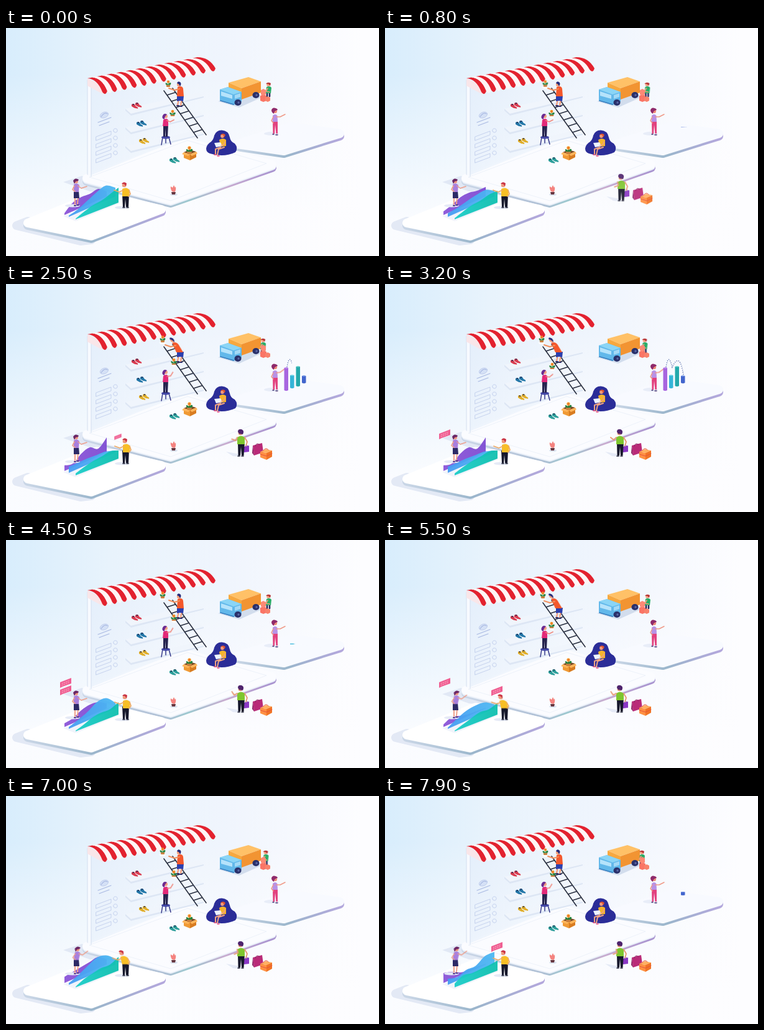
These frames come from a looping animation (600x367 px, 8 s). An HTML page:

```html
<!DOCTYPE html>
<html lang="en">
<head>
<meta charset="utf-8">
<title>Isometric shop</title>
<style>
html, body { margin: 0; width: 100%; height: 100%; overflow: hidden; background: #fff; }
svg { display: block; width: 100vw; height: 100vh; }
.line { fill: none; stroke-linecap: round; stroke-linejoin: round; }
.move { animation: 8s ease-in-out infinite; }
.slab { stroke-width: 14; stroke-linejoin: round; }

/* Ladder climber and woman on the stool */
#lean { animation-name: lean; transform-origin: 280px 112px; }
@keyframes lean {
  0%, 12%, 56%, 60%, 80%, 100% { transform: skewX(0); }
  21.25% { transform: skewX(6deg); }
  32%, 44%, 67%, 71% { transform: skewX(27deg); }
}
#reach { animation-name: reach; }
@keyframes reach {
  0%, 12%, 56%, 60%, 80%, 100% { transform: none; }
  21.25% { transform: translate(-2px, 0); }
  32%, 44%, 67%, 71% { transform: translate(-6px, 1px); }
}
#high { animation-name: high; }
@keyframes high {
  0%, 5% { transform: none; }
  17%, 58% { transform: translate(-9px, -1px); }
  68.75% { transform: translate(-7px, -1px); }
  78%, 91% { transform: translate(-9px, -1px); }
  98.75%, 100% { transform: translate(-3px, 0); }
}
#lift { animation-name: lift; }
@keyframes lift {
  0%, 11%, 43%, 46%, 67%, 74% { transform: none; }
  19%, 33%, 53%, 60%, 83%, 100% { transform: translate(2px, -12px); }
  40% { transform: translate(1px, -5px); }
}
#arms { animation-name: arms; transform-origin: 259px 148px; }
@keyframes arms {
  0%, 11%, 43%, 46%, 67%, 74% { transform: none; }
  19%, 33%, 53%, 60%, 83%, 100% { transform: rotate(-32deg); }
  40% { transform: rotate(-13deg); }
}

/* Loader, presenter and shopper */
#loader { animation-name: loader; }
@keyframes loader {
  0%, 8%, 53%, 72%, 100% { transform: none; }
  19%, 30%, 98.75%, 99.9% { transform: translateX(-9px); }
  40%, 87.5% { transform: translateX(-4.5px); }
}
#point { animation-name: point; transform-origin: 435px 143px; }
@keyframes point {
  0%, 10%, 54%, 100% { transform: none; }
  19%, 45% { transform: rotate(-9deg); }
}
#shopper { animation-name: arrive; }
@keyframes arrive {
  0%, 2% { opacity: 0; transform: translate(26px, 13px); }
  12%, 100% { opacity: 1; transform: none; }
}
#wave { animation-name: wave; transform-origin: 372px 247px; }
@keyframes wave {
  0%, 25%, 80%, 100% { transform: rotate(-58deg); }
  35%, 46% { transform: none; }
  56%, 70% { transform: rotate(18deg); }
}

/* Chart pair */
#girl { animation-name: girl; transform-origin: 113px 264px; }
@keyframes girl {
  0%, 60% { transform: none; }
  67%, 100% { transform: skewX(-8deg); }
}
#girlArm { animation-name: girlArm; transform-origin: 116px 254px; }
@keyframes girlArm {
  0%, 60% { transform: none; }
  67%, 100% { transform: rotate(-22deg); }
}
#guy { animation-name: guy; transform-origin: 192px 272px; }
@keyframes guy {
  0%, 10%, 92%, 100% { transform: none; }
  20%, 58% { transform: translate(1px, 0); }
  67%, 88% { transform: skewX(13deg); }
}

/* Bubbles */
.bubble { transform-box: fill-box; transform-origin: 50% 100%; }
#sayR { animation-name: sayR; }
@keyframes sayR {
  0%, 15%, 33%, 63%, 78%, 93%, 100% { transform: scale(0); }
  18%, 30%, 66%, 75%, 96%, 99.9% { transform: scale(1); }
}
#sayL1 { animation-name: sayL1; }
@keyframes sayL1 {
  0%, 33% { transform: scale(0); }
  36%, 50% { transform: scale(1); }
  53%, 74% { transform: translateY(-12px) scale(1); }
  77%, 100% { transform: translateY(-12px) scale(0); }
}
#sayL2 { animation-name: sayL2; }
@keyframes sayL2 {
  0%, 51%, 64%, 100% { transform: scale(0); }
  54%, 61% { transform: scale(1); }
}

/* Bars rise from the floor and sink back */
.bar { transform-box: fill-box; transform-origin: 50% 100%; animation: grow 8s ease-in-out infinite backwards; }
#bar2 { animation-delay: .12s; }
#bar4 { animation-name: growLast; }
@keyframes grow {
  0%, 12%, 56%, 100% { transform: scaleY(0); }
  19%, 49% { transform: none; }
}
@keyframes growLast {
  0%, 9%, 54%, 96.5%, 100% { transform: scaleY(0); }
  16%, 47% { transform: none; }
  99.9% { transform: scaleY(.6); }
}
#hops { animation-name: hops; }
@keyframes hops {
  0%, 28% { clip-path: inset(0 100% 0 0); opacity: 1; }
  37%, 44% { clip-path: inset(0 0 0 0); opacity: 1; }
  52%, 100% { clip-path: inset(0 0 0 0); opacity: 0; }
}
</style>
</head>
<body>
<svg viewBox="0 0 600 367" preserveAspectRatio="none">
  <defs>
    <linearGradient id="sky">
      <stop offset="0" stop-color="#d8edfc"/><stop offset=".28" stop-color="#e8f3fc"/>
      <stop offset=".6" stop-color="#f0f5fd"/><stop offset=".95" stop-color="#fdfdff"/>
    </linearGradient>
    <linearGradient id="fade" x2="0" y2="1">
      <stop offset=".2" stop-color="#fdfdff" stop-opacity="0"/><stop offset=".85" stop-color="#fdfdff" stop-opacity=".92"/>
    </linearGradient>
    <linearGradient id="edge">
      <stop offset="0" stop-color="#cad6e7"/><stop offset=".42" stop-color="#aebfd4"/>
      <stop offset=".55" stop-color="#9cc8cf"/><stop offset=".75" stop-color="#c9acd0"/>
      <stop offset="1" stop-color="#a994d0"/>
    </linearGradient>
    <linearGradient id="edge2">
      <stop offset="0" stop-color="#c9d6e6"/><stop offset=".5" stop-color="#9bb6cc"/>
      <stop offset="1" stop-color="#b3a8dc"/>
    </linearGradient>
    <linearGradient id="wall" x2="1" y2=".6">
      <stop offset="0" stop-color="#e3eefb"/><stop offset="1" stop-color="#f3f7fd" stop-opacity=".6"/>
    </linearGradient>
    <linearGradient id="violet"><stop offset="0" stop-color="#8b55d8"/><stop offset="1" stop-color="#7e4bd2"/></linearGradient>
    <linearGradient id="azure"><stop offset="0" stop-color="#469bf2"/><stop offset="1" stop-color="#4cb8f2"/></linearGradient>
    <linearGradient id="mint"><stop offset="0" stop-color="#1bcdc8"/><stop offset="1" stop-color="#0fbfae"/></linearGradient>
    <path id="floor" d="M130 242 292 184 428 220 265 277Z"/>
    <path id="floorL" d="M35 314 146 269 250 292 137 335Z"/>
    <path id="floorR" d="M372 187 459 159 537 170 447 198Z"/>
    <g id="plant">
      <path d="M-4 3H4L3 7H-3Z" fill="#c9803f"/>
      <path d="M0 3Q-6 4-5-1Q-2-1 0 3Q1-2 5-1Q6 4 0 3" fill="#27843f"/>
      <path class="line" d="M0 3V-3" stroke="#27843f"/>
      <circle cy="-3" r="2.7" fill="#f59a2c"/><circle cy="-3" r="1" fill="#e2532d"/>
    </g>
    <g id="shoe">
      <path d="M-5-3Q-2-5 0-3Q1 0 4 1Q6 2 5 4Q0 4-5 0Z"/>
      <path class="line" d="M-5 1Q0 4.6 5 4.4" stroke="#f4f6fb" stroke-width="1"/>
      <path d="M-4-3Q-2-4.5-.5-3L-2-1.5Z" fill="#2b3157"/>
    </g>
    <g id="shoes"><use href="#shoe" x="3" y="-1"/><use href="#shoe" x="-3" y="1"/></g>
    <g id="talk">
      <path d="M-9-1 9-8V1L-5 6-9 8Z" fill="#ef5f92"/>
      <path class="line" d="M-6 1 6-3.7M-6 3.8 5-.6" stroke="#ffc0d4" stroke-width=".8" stroke-dasharray="1.6 1.8"/>
    </g>
  </defs>

  <rect width="600" height="367" fill="url(#sky)"/>
  <rect width="600" height="367" fill="url(#fade)"/>

  <!-- Platforms -->
  <g class="slab">
    <path d="M92 248 122 238 190 267 135 263Z" fill="#dbe3f2" opacity=".75"/>
    <path d="M17 318 35 311 137 341 120 343Z" fill="#e3e9f5" stroke="#e3e9f5"/>
    <use href="#floorR" y="4" fill="url(#edge2)" stroke="url(#edge2)"/>
    <use href="#floorR" fill="#f8faff" stroke="#f8faff"/>
    <use href="#floor" y="5" fill="url(#edge)" stroke="url(#edge)"/>
    <use href="#floor" y="2" fill="#eaf0f9" stroke="#eaf0f9"/>
    <use href="#floor" fill="#fbfcff" stroke="#fbfcff"/>
    <path d="M134 240 292 181 419 218 265 278Z" fill="none" stroke="#edf2fa" style="stroke-width:1"/>
    <use href="#floorL" y="4" fill="url(#edge2)" stroke="url(#edge2)"/>
    <use href="#floorL" fill="#fff" stroke="#fff"/>
  </g>

  <!-- Wall and shelves -->
  <path d="M134 94V238L316 165 308 62Z" fill="url(#wall)"/>
  <path d="M131 84V236L137 239V88Z" fill="#f7faff"/>
  <path d="M131 84V236M137 92V239" class="line" stroke="#d0dcee" stroke-width=".9"/>
  <g id="shelves"></g>
  <g class="line" stroke="#bccaea" stroke-width=".8">
    <ellipse cx="158" cy="140" rx="7" ry="4.5" transform="rotate(-22 158 140)" fill="#d5e1f6"/>
    <path d="M153 143Q158 135 163 138M148 152 169 144M150 157 166 151" stroke="#a9b9e2" stroke-width="1.2"/>
    <path id="fields" d=""/>
  </g>
  <use href="#shoes" x="210" y="125" fill="#d93b4f"/>
  <use href="#shoes" x="218" y="154" fill="#2377a8"/>
  <use href="#shoes" x="222" y="182" fill="#e0ad28"/>
  <use href="#shoes" x="271" y="213" fill="#2a9d99"/>

  <!-- Awning -->
  <path d="M131 81V93L157 107 150 90Z" fill="#f9e6e9"/>
  <g id="awning"></g>

  <!-- Ladder -->
  <path id="ladder" class="line" stroke="#2a3040" stroke-width="1.6"/>

  <!-- Climber -->
  <g>
    <path class="line" d="M278 115 276 124M283 115 281 124" stroke="#f0a080" stroke-width="2.4"/>
    <path class="line" d="M275 125H278M280 126H283" stroke="#30316f" stroke-width="2"/>
    <path d="M275 109H286L285 118 280 117 275 118Z" fill="#2b3fae"/>
    <g id="high" class="move">
      <use href="#plant" transform="translate(261 89) scale(.85)"/>
      <path d="M255 95H266L264 98H258Z" fill="#fff" opacity=".95"/>
    </g>
    <g id="lean" class="move">
      <path d="M276 95Q284 92 285 98L286 110H275Z" fill="#f4582c"/>
      <circle cx="278" cy="91" r="3.1" fill="#f2a07c"/>
      <path d="M275 89Q276 85 280 87Q283 89 280 94Q279 90 275 89" fill="#242a79"/>
    </g>
    <path id="reach" class="move line" d="M279 98 271 100 262 97" stroke="#f2905d" stroke-width="2"/>
  </g>

  <!-- Woman on stool -->
  <g>
    <path class="line" d="M252 176 250 188M262 176 265 187M257 177V185" stroke="#353889" stroke-width="1.5"/>
    <ellipse cx="257" cy="176" rx="7" ry="2.4" fill="#4347a5"/>
    <path d="M253 155H261L260 175H257V162L256 175H253Z" fill="#25234e"/>
    <path d="M253 148Q258 144 261 148L261 158H252Z" fill="#e32a78"/>
    <circle cx="257" cy="142" r="3" fill="#f2a183"/>
    <path d="M259 139Q254 136 252 141Q250 146 255 147Q255 142 259 139" fill="#6b2b91"/>
    <g id="lift" class="move"><use href="#plant" transform="translate(268 137) scale(.9)"/><path d="M264 142H272L271 145H266Z" fill="#fff"/></g>
    <g id="arms" class="move"><path class="line" d="M259 149 264 151 270 148" stroke="#ef8b80" stroke-width="1.8"/></g>
  </g>

  <!-- Floor items -->
  <path d="M286 200 296 203V213L286 209Z" fill="#f09a35"/><path d="M296 203 306 199V208L296 213Z" fill="#d87c21"/>
  <path d="M286 200 295 196 306 199 296 203Z" fill="#7a4a24"/><path d="M286 200 283 203 293 206 296 203M306 199 308 202 299 206 296 203" fill="#ffb55a"/>
  <use href="#plant" x="295" y="196"/>
  <ellipse cx="270" cy="268" rx="6" ry="2" fill="#dce5f2"/>
  <path d="M266 264H273L272 268H267Z" fill="#663740"/>
  <path d="M267 263Q264 258 265 255L268 257 270 253 272 257 273 255Q274 262 271 264Z" fill="#f4837f"/>

  <!-- Beanbag -->
  <path d="M322 194Q323 187 330 183Q334 179 335 173Q338 164.500 347 164.500Q358 165 360 176Q361 183 368 186Q374 193 369 200Q350 209 328 202Q322 200 322 194Z" fill="#2b2d98"/>
  <path d="M343 180Q349 176 354 180L354 190 345 191Z" fill="#f5b52d"/>
  <circle cx="348" cy="174" r="2.9" fill="#ef9b7d"/><path d="M345 172Q349 168 353 172L351 176 349 172Z" fill="#e0552f"/>
  <path class="line" d="M351 192 342 195 340 204M345 192 337 195 337 203" stroke="#f0a583" stroke-width="2"/>
  <path d="M335 185 345 184 348 190 338 192Z" fill="#eef3ff"/><path class="line" d="M352 183 351 187 346 189" stroke="#f1a084" stroke-width="1.5"/>
  <path class="line" d="M335 204H338M340 206H343" stroke="#e6407a" stroke-width="1.5"/>

  <!-- Truck -->
  <path d="M341 118 375 128 413 111 400 104Z" fill="#d2dded"/>
  <path d="M358 88 390 79 410 86 379 97Z" fill="#ffc167"/>
  <path d="M358 88 379 97V116L358 108Z" fill="#f7a83f"/>
  <path d="M379 97 410 86V104L379 115Z" fill="#f29432"/>
  <path d="M344 99 357 95 379 103V119L366 124 344 117Z" fill="#62b8ea"/>
  <path d="M344 99 357 95 379 103 366 107Z" fill="#8bd5f6"/>
  <path d="M346 102 364 108V114L346 109Z" fill="#b5e3fb"/><path d="M368 108 377 105V111L368 114Z" fill="#a3d9f6"/>
  <path class="line" d="M345 117 366 123" stroke="#397fc0" stroke-width="1.6"/>
  <g fill="#29306a"><ellipse cx="373" cy="120" rx="5.500" ry="5"/><ellipse cx="402" cy="108" rx="5.500" ry="5"/></g>
  <g fill="#5a66a5"><circle cx="374" cy="120" r="1.7"/><circle cx="403" cy="108" r="1.7"/></g>

  <!-- Loader -->
  <g id="loader" class="move">
    <path class="line" d="M420 104V110M424 104V110" stroke="#27275c" stroke-width="2.6"/>
    <path d="M419 95Q424 92 427 96L426 105H418Z" fill="#27ad68"/>
    <circle cx="422" cy="91" r="2.8" fill="#ef9d7b"/><path d="M418 90Q421 86 426 89L425 93 422 90Z" fill="#b73435"/>
    <path class="line" d="M421 97 418 102 424 103" stroke="#ef9d7b" stroke-width="1.7"/>
  </g>
  <path d="M409 109 414 107 419 109V117L414 119 409 117Z" fill="#fa7566"/><path d="M410 100 414 98 418 100V107L414 109 410 107Z" fill="#fc8975"/>
  <path d="M417 112 421 110 425 112V117L421 119 417 117Z" fill="#f8826c"/>

  <!-- Presenter -->
  <ellipse cx="427" cy="170" rx="12" ry="3" fill="#e8edf8"/>
  <path d="M429 150H437L437 170H434.500L433 156 432 170H429.500Z" fill="#e2417e"/>
  <path class="line" d="M429 171H431M434 172H437" stroke="#40276a" stroke-width="1.4"/>
  <path d="M429 141Q433 137 436.500 141L437 151H428.500Z" fill="#b892e5"/>
  <circle cx="433" cy="134" r="3.1" fill="#ef8c78"/><path d="M436 130Q429 126 427 132Q427 136 431 138Q431 133 437 132Z" fill="#8f2a6b"/>
  <path class="line" d="M430 143 427 149 430 153" stroke="#ef9a88" stroke-width="1.5"/>
  <path id="point" class="move line" d="M435 143 441 143 449 139" stroke="#ef9a88" stroke-width="1.6"/>
  <g id="bars"></g>
  <path id="hops" class="move" d="M452 134Q456 109 462 134Q474 108 480 146" fill="none" stroke="#5267a8" stroke-width="1.3" stroke-dasharray="1.3 2"/>

  <!-- Chart -->
  <path d="M92 303 112 311 183 282 165 275Z" fill="#f1f4fb"/>
  <g id="waves"></g>

  <!-- Chart pair -->
  <ellipse cx="107" cy="286" rx="12" ry="2.5" fill="#e5eaf6"/>
  <path class="line" d="M111 272V284M116 272 115 283" stroke="#eea08b" stroke-width="2"/>
  <path class="line" d="M110 286H112M114 285H117" stroke="#4a318c" stroke-width="1.8"/>
  <path d="M109 262H117L118 274H109Z" fill="#2d2a66"/>
  <g id="girl" class="move">
    <path d="M109 252Q114 248 118 253L117 264H109Z" fill="#a97fdd"/>
    <circle cx="113" cy="247" r="3" fill="#ef947f"/><path d="M108 246Q111 240 117 244L116 246 112 247 110 251Z" fill="#6a2765"/>
    <path class="line" d="M110 254 107 260 111 263" stroke="#eca08d" stroke-width="1.7"/>
    <path id="girlArm" class="move line" d="M116 254 121 258 130 255" stroke="#eca08d" stroke-width="1.6"/>
  </g>
  <ellipse cx="187" cy="289" rx="12" ry="2.4" fill="#e5eaf6"/>
  <path d="M187 268H198L197 288H193L192 275 191 288H188Z" fill="#15172a"/>
  <path class="line" d="M188 289H191M194 289H197" stroke="#15172a" stroke-width="1.6"/>
  <g id="guy" class="move">
    <path d="M187 259Q194 255 199 261L198 271H187Z" fill="#f8bf26"/>
    <circle cx="190" cy="253" r="3.3" fill="#ed997c"/><path d="M186 251Q189 246 194 250L193 255 190 251Z" fill="#c93243"/>
    <path class="line" d="M189 261 182 264 174 261M198 261 200 267 197 271" stroke="#eeaa65" stroke-width="1.8"/>
  </g>
  <g transform="translate(180 243)"><use id="sayR" class="move bubble" href="#talk"/></g>
  <g transform="translate(96 242)"><use id="sayL1" class="move bubble" href="#talk"/><use id="sayL2" class="move bubble" href="#talk"/></g>

  <!-- Shopper -->
  <g id="shopper" class="move">
    <path d="M354 270 376 274 378 278 365 277Z" fill="#e5eaf6"/>
    <path d="M383 262 391 260V270L383 271Z" fill="#8a38c4"/>
    <path class="line" d="M385 262Q386 257 389 261" stroke="#6a2da0"/>
    <path d="M373 255H384L382.500 276H379L378 262 377 276H373.500Z" fill="#17182c"/>
    <path class="line" d="M373 277H376M379 277H382" stroke="#17182c" stroke-width="1.5"/>
    <path d="M372 247Q378 242 384 247L384 258H372Z" fill="#7fc62f"/>
    <circle cx="377" cy="240" r="3.3" fill="#e49678"/><path d="M373 238Q373 233 379 234Q384 236 381 242L375 241Z" fill="#4f246d"/>
    <path class="line" d="M384 247 388 254 386 260" stroke="#e89c79" stroke-width="2"/>
    <path id="wave" class="move line" d="M372 247 368 251 363 247" stroke="#e89c79" stroke-width="2"/>
    <path d="M397 260 412 256 414 271 399 276Z" fill="#b92b78"/><path d="M397 260 399 276 396 272Z" fill="#8e1e63"/>
    <path class="line" d="M401 261Q403 254 408 259" stroke="#882363"/>
    <path d="M409 270 418 266 428 268 419 272Z" fill="#ffb060"/><path d="M409 270 419 272V283L409 279Z" fill="#ff9143"/><path d="M419 272 428 268V278L419 283Z" fill="#f17426"/>
    <path class="line" d="M409 274 419 277 428 273M414 268Q418 262 422 267" stroke="#e5533c"/>
  </g>
</svg>

<script>
const SVG = "http://www.w3.org/2000/svg";
const LOOP = 8000;
const $ = id => document.getElementById(id);

function add(parent, d, fill, attrs = {}) {
  const path = document.createElementNS(SVG, "path");
  for (const [k, v] of Object.entries({ d, fill, ...attrs })) path.setAttribute(k, v);
  return $(parent).appendChild(path);
}

// Awning stripes run over a curved roof and end in a scallop.
const STRIPES = 23;
const ridge = t => [131 + 177 * t, 81 - 34 * t];
const hem = t => [155 + 182 * t, 103 - 38 * t];
const bend = t => [147 + 180 * t, 82 - 35 * t];
for (let i = 0; i < STRIPES; i++) {
  const a = i / STRIPES, b = (i + 1) / STRIPES;
  const [x, y] = hem((a + b) / 2);
  add("awning", `M${ridge(a)}Q${bend(a)} ${hem(a)}Q${x + 1},${y + 8} ${hem(b)}Q${bend(b)} ${ridge(b)}Z`,
    i % 2 ? "#fff5f5" : "#e3222f");
}

for (let i = 0; i < 3; i++) {
  const y = 130 + i * 30;
  add("shelves", `M192 ${y}L310 ${y - 26} 318 ${y - 20} 201 ${y + 8}Z`, "#f0f5fc");
  add("shelves", `M192 ${y}L201 ${y + 8} 318 ${y - 20}V${y - 18}L201 ${y + 11} 192 ${y + 3}Z`, "#dde6f4");
}

let fields = "";
for (let i = 0; i < 4; i++) {
  const y = 175 + i * 12;
  fields += `M145 ${y}L169 ${y - 9}V${y - 3}L145 ${y + 6}ZM173 ${y - 9}a3 3 0 1 0 6-2a3 3 0 1 0-6 2`;
}
$("fields").setAttribute("d", fields);

let ladder = "M254 101 308 177M268 97 322 172";
for (let i = 0; i < 7; i++) {
  const x = 259 + i * 7.1, y = 108 + i * 10;
  ladder += `M${x} ${y}l14-4.5`;
}
$("ladder").setAttribute("d", ladder);

// Bars: left, top, bottom, face, cap
[[447.5, 135, 171, "#a765df", "#c490ee"], [457, 147, 167, "#35b5d8", "#79d9e9"],
 [466.5, 133, 164, "#23a9ab", "#65d0c8"], [476, 148, 159, "#4265cd", "#7798e7"]
].forEach(([x, y, end, face, cap], i) => {
  const g = $("bars").appendChild(document.createElementNS(SVG, "g"));
  g.id = "bar" + (i + 1);
  g.setAttribute("class", "bar");
  add(g.id, `M${x} ${y}V${end}q3.3 2 6.5 0V${y}Z`, face);
  add(g.id, `M${x} ${y}q3.2-2 6.5 0q-3.2 2-6.5 0`, cap);
});

// Each wave stands on a slanted base line; its heights change between key poses.
const times = [0, 1700, 3200, 4500, 5500, 7000, 7900, 8000];
const waves = [
  { from: [94, 301], to: [162, 271], fill: "violet", poses: [
    [3, 14, 17, 16, 18, 8], [9, 6, 16, 20, 12, 24], [6, 8, 15, 18, 16, 8],
    [4, 10, 6, 3, 2, 1], [10, 12, 14, 16, 18, 8], [16, 12, 5, 3, 2, 1]] },
  { from: [101, 304], to: [176, 271], fill: "azure", poses: [
    [2, 6, 13, 20, 24, 14], [10, 10, 10, 9, 8, 3], [3, 8, 14, 23, 23, 9],
    [2, 10, 16, 18, 16, 6], [3, 9, 17, 24, 21, 9], [10, 6, 11, 11, 20, 20]] },
  { from: [112, 308], to: [181, 281], fill: "mint", poses: [
    [1, 7, 12, 14, 19, 24], [3, 8, 12, 14, 17, 13], [1, 6, 12, 14, 14, 20],
    [1, 6, 11, 15, 14, 19], [1, 8, 12, 15, 15, 22], [6, 14, 12, 13, 14, 16]] }
];
const order = [0, 1, 1, 2, 3, 4, 5, 5];
for (const w of waves) w.path = add("waves", "", `url(#${w.fill})`, { opacity: .95 });

function curve(points) {
  const at = i => points[Math.max(0, Math.min(points.length - 1, i))];
  let d = `L${points[0]}`;
  for (let i = 0; i < points.length - 1; i++) {
    const [a, b, c, e] = [at(i - 1), at(i), at(i + 1), at(i + 2)];
    const p = b.map((v, k) => v + (c[k] - a[k]) / 6);
    const q = c.map((v, k) => v - (e[k] - b[k]) / 6);
    d += `C${p} ${q} ${c}`;
  }
  return d;
}

function draw(now) {
  const t = now % LOOP;
  let i = 0;
  while (t >= times[i + 1]) i++;
  const u = (t - times[i]) / (times[i + 1] - times[i]);
  const s = u * u * (3 - 2 * u);
  for (const { from, to, poses, path } of waves) {
    const a = poses[order[i]], b = poses[order[i + 1]];
    const points = a.map((h, k) => [
      from[0] + (to[0] - from[0]) * k / 5,
      from[1] + (to[1] - from[1]) * k / 5 - h - (b[k] - h) * s
    ]);
    path.setAttribute("d", `M${from}${curve(points)}L${to}Z`);
  }
}

const start = performance.now();
function tick() {
  draw(performance.now() - start);
  requestAnimationFrame(tick);
}
tick();
</script>
</body>
</html>
```
